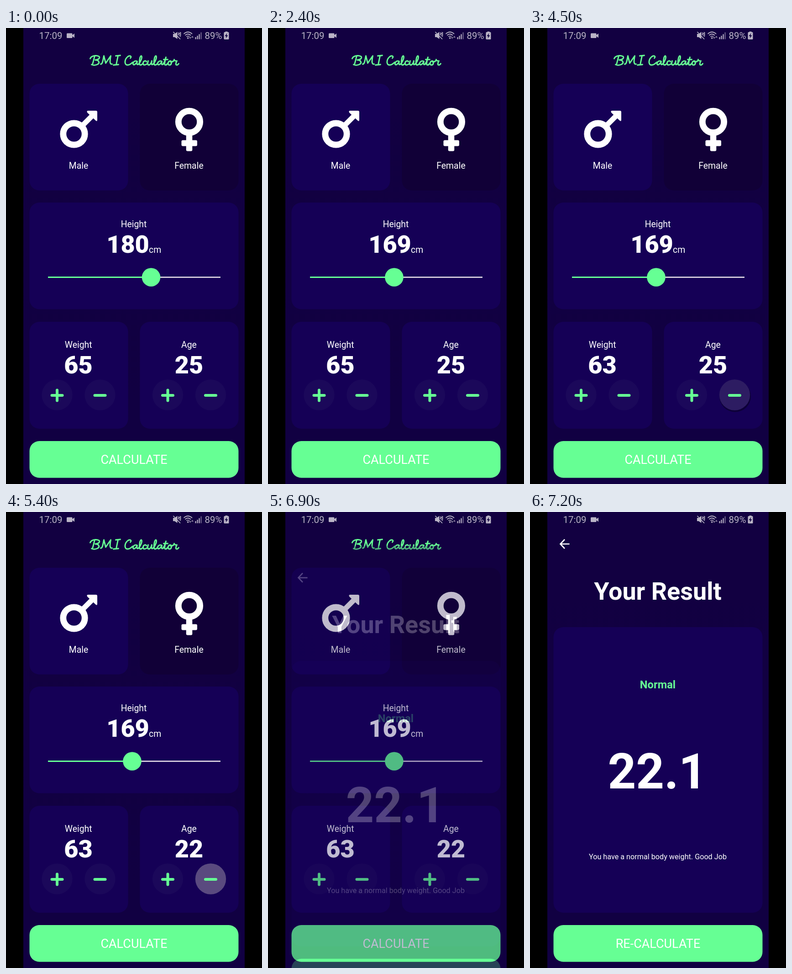
Write an HTML page that moves like this. It is 561x998 px and loops after 8000 ms.

```html
<!DOCTYPE html>
<html lang="en">
<head>
<meta charset="utf-8">
<title>BMI Calculator</title>
<style>
html, body { margin: 0; width: 100%; height: 100%; overflow: hidden; background: #000; }
svg { display: block; width: 100vw; height: 100vh; }
text { font-family: Roboto, sans-serif; font-size: 19.4px; fill: #fff; text-anchor: middle; }
.value { font-size: 53.9px; font-weight: 900; }
.action { font-size: 27px; }
.start { text-anchor: start; }
.green { fill: #66ff94; }
.status text { font-size: 20.5px; fill: #bab4c6; }
</style>
</head>
<body>
<svg id="stage" viewBox="0 0 561 998">
  <defs>
    <clipPath id="screen"><rect x="38" width="485" height="998"/></clipPath>
    <linearGradient id="backdrop" x2="0" y2="1">
      <stop stop-color="#120041"/><stop offset="1" stop-color="#110042"/>
    </linearGradient>
  </defs>
  <rect width="561" height="998"/>
  <g clip-path="url(#screen)">
    <rect x="38" width="485" height="998" fill="url(#backdrop)"/>
    <g id="form">
      <g id="title" role="img" aria-label="BMI Calculator" fill="none" stroke="#66ff94"
         stroke-width="2.9" stroke-linecap="round" stroke-linejoin="round"></g>
      <g id="formCards"></g>
      <g fill="none" stroke="#fff">
        <circle cx="149" cy="232" r="23.7" stroke-width="13.8"/>
        <path d="M168 213 189 192" stroke-width="11.5"/>
        <circle cx="401.5" cy="205.3" r="23.7" stroke-width="13.8"/>
      </g>
      <path fill="#fff" d="M180.5 181H197Q200 181 200 184V200.500Q200 205.500 196.500 202.500L178.500 185.500Q175.500 181 180.500 181Z"/>
      <g fill="#fff">
        <rect x="394.800" y="232" width="13.500" height="37.500" rx="3"/>
        <rect x="384.500" y="245.500" width="34.500" height="13" rx="3"/>
      </g>
      <text x="159" y="308">Male</text>
      <text x="401" y="308">Female</text>
      <text x="280" y="436">Height</text>
      <text id="height" class="value" x="267" y="492"></text>
      <text class="start" x="313" y="491.500">cm</text>
      <path d="M92 545.500H470" stroke="#efe9ee" stroke-width="2.600"/>
      <path id="track" stroke="#66ff94" stroke-width="2.800"/>
      <circle id="halo" cy="545.500" fill="#1b1266"/>
      <circle id="thumb" class="green" cy="545.500" r="20.300"/>
      <text x="158.700" y="700">Weight</text>
      <text id="weight" class="value" x="158.500" y="756"></text>
      <text x="401" y="700">Age</text>
      <text id="age" class="value" x="401" y="756"></text>
      <g id="buttons"></g>
      <text class="action" x="280.500" y="954">CALCULATE</text>
    </g>
    <g id="result">
      <rect x="38" width="485" height="998" fill="url(#backdrop)"/>
      <path d="M86.500 70H67M76 60 66.500 70 76 80" fill="none" stroke="#fff" stroke-width="2.700"/>
      <text x="280" y="191.500" font-weight="700" style="font-size:53.900px">Your Result</text>
      <g id="resultCards"></g>
      <text class="green" x="280" y="386" font-weight="700" style="font-size:23.700px">Normal</text>
      <text x="279" y="605" font-weight="700" style="font-size:107.900px">22.1</text>
      <text x="280" y="760" style="font-size:16.200px">You have a normal body weight. Good Job</text>
      <text class="action" x="280.500" y="954">RE-CALCULATE</text>
    </g>
    <g class="status" fill="#bab4c6">
      <text class="start" x="72.500" y="24">17:09</text>
      <path d="M134.500 11.500H144Q145.500 11.500 145.500 13V15.500L150 12V21.500L145.500 18V20.500Q145.500 22 144 22H134.500Q133 22 133 20.500V13Q133 11.500 134.500 11.500Z"/>
      <path d="M366 13H369.500L375.500 8.500V24L369.500 20H366Z"/>
      <g fill="none" stroke="#bab4c6" stroke-width="1.700">
        <path d="M366.500 8.500 382 24.500M377.500 10l2 2-2 2 2 2M381 9l2 2-2 2 2 2-2 2 2 2"/>
        <path d="M389.500 13Q398.500 4.500 408 13M392.500 16Q398.500 10.500 405 16M395.500 19Q398.500 16.500 402 19"/>
      </g>
      <circle cx="398.700" cy="22" r="1.800"/>
      <path d="M401 20h5l-2.500 4ZM406 21h5l-2.500-4Z" opacity=".7"/>
      <path d="M414.500 20h2.200v4.500h-2.200ZM418.500 17h2.200v7.500h-2.200ZM422.500 13.500h2.200v11h-2.200Z"/>
      <path d="M426.500 9.500h2.200v15h-2.200Z" opacity=".55"/>
      <text class="start" x="435.500" y="24">89%</text>
      <path d="M480.500 9V7.800h5V9H487Q488.500 9 488.500 10.500V23.500Q488.500 25 487 25H479Q477.500 25 477.500 23.500V10.500Q477.500 9 479 9Z"/>
      <path d="M484.500 11 479.500 18H482.500L481.500 23 486.500 16H483.500Z" fill="#120041"/>
    </g>
  </g>
</svg>
<script>
const LOOP = 8000, STEP = 100;
const $ = id => document.getElementById(id);

function add(parent, tag, attrs) {
  const node = document.createElementNS('http://www.w3.org/2000/svg', tag);
  for (const key in attrs) node.setAttribute(key, attrs[key]);
  return parent.appendChild(node);
}

function card(parent, x, y, width, height, fill = '#150056') {
  add(parent, 'rect', { x, y, width, height, rx: 21.5, fill });
}
const GREEN = '#66ff94';
const formCards = $('formCards'), resultCards = $('resultCards');
card(formCards, 51.5, 122, 216, 233.5);
card(formCards, 293.5, 122, 216, 233.5, '#110037');
card(formCards, 51.5, 382, 458, 233.5);
card(formCards, 51.5, 643, 216, 234);
card(formCards, 293.5, 643, 216, 234);
card(formCards, 51.5, 904, 458, 80.5, GREEN);
card(resultCards, 51.5, 252, 458, 625);
card(resultCards, 51.5, 904, 458, 80.5, GREEN);

// Script lettering: each glyph is a pen stroke relative to its baseline.
const glyphs = {
  B: 'M1-14C3-20 13-22 20-19C24-16 19-11 12-11C21-11 23-4 16-1C11 1 6 0 4-1M11-20 6-1',
  M: 'M0-2C4-1 5-11 7-20L11-4 22-20C21-13 18-1 25-2',
  I: 'M5-20 15-21M10-20 6-1M0 0 11-1',
  C: 'M13-15C17-19 12-22 7-18C0-12-1 0 7 0C12 0 15-3 18-6',
  a: 'M10-8C4-11 0-5 1-2C3 2 8-3 10-8C9-3 9 1 13-2',
  l: 'M0-2C5-7 9-18 6-20C2-19 0 0 4 0Q7 0 9-3',
  c: 'M8-7C8-11 1-9 1-4C1 2 7 0 10-3',
  u: 'M2-9C0-2 1 0 4 0C7-1 9-5 10-9C9-2 9 1 13-2',
  t: 'M0-2C3-7 5-12 6-17C3-6 2 0 5 0Q8 0 9-3M1-12H10',
  o: 'M6-9C0-8 0 0 4 0C9 0 10-8 6-9C6-6 9-6 12-8',
  r: 'M0-8Q3-9 3-12C4-8 7-9 9-9C6-4 6 0 9 0Q11 0 13-3'
};
const advance = { B: 24, M: 28, I: 24, C: 18, a: 13, l: 9, c: 10, u: 13, t: 9.5, o: 11.5, r: 12 };
let pen = 183.5;
for (const letter of 'BMICalculator') {
  add($('title'), 'path', { d: glyphs[letter], transform: `translate(${pen} 81)` });
  pen += advance[letter];
}

function roundButton(x, plus) {
  const shadow = add($('buttons'), 'circle', { cx: x + 1, cy: 806, r: 34.5, fill: '#0d0038' });
  const face = add($('buttons'), 'circle', { cx: x, cy: 803, r: 33.7 });
  add($('buttons'), 'path', {
    d: `M${x - 11.5} 804h23` + (plus ? `M${x} 792.5v23` : ''),
    stroke: GREEN, 'stroke-width': 6, 'stroke-linecap': 'round'
  });
  return press => {
    face.setAttribute('fill', ['#1b085a', '#2d1c62', '#5a4a7f', '#3b2a6c'][press]);
    shadow.setAttribute('opacity', press === 1 ? 1 : 0);
  };
}
const weightPlus = roundButton(112, true), weightMinus = roundButton(206, false);
const agePlus = roundButton(354.5, true), ageMinus = roundButton(448.5, false);
weightPlus(0);
agePlus(0);

// Taps as [finger down, finger up].
const weightTaps = [[3000, 3200], [3400, 3500]];
const ageTaps = [[4400, 4600], [4800, 4900], [5300, 5400]];
const tapCount = (taps, t) => taps.filter(tap => t >= tap[1]).length;
function pressState(taps, t) {
  const tap = taps.find(([down, up]) => t >= down && t < up + 200);
  if (!tap) return 0;
  return t < tap[1] ? 1 : t < tap[1] + 100 ? 2 : 3;
}

const clamp = v => Math.min(1, Math.max(0, v));

function bezier(x1, y1, x2, y2) {
  const at = (a, b, s) => 3 * a * s * (1 - s) ** 2 + 3 * b * s * s * (1 - s) + s ** 3;
  return x => {
    let low = 0, high = 1;
    for (let i = 0; i < 24; i++) {
      const mid = (low + high) / 2;
      if (at(x1, x2, mid) < x) low = mid; else high = mid;
    }
    return at(y1, y2, low);
  };
}
const slideEase = bezier(0.4, 0, 0.2, 1), fadeEase = bezier(0.42, 0, 1, 1);

function render(t) {
  const height = Math.round(180 - 11.2 * clamp((t - 1000) / 800));
  const x = 91.5 + 3.775 * (height - 120);
  const haloSize = Math.min(clamp((t - 950) / 150), clamp((2100 - t) / 300));
  $('height').textContent = height;
  $('track').setAttribute('d', `M92 545.5H${x}`);
  $('thumb').setAttribute('cx', x);
  $('halo').setAttribute('cx', x);
  $('halo').setAttribute('r', 40.5 * haloSize);

  $('weight').textContent = 65 - tapCount(weightTaps, t);
  $('age').textContent = 25 - tapCount(ageTaps, t);
  weightMinus(pressState(weightTaps, t));
  ageMinus(pressState(ageTaps, t));

  const p = clamp((t - 6765) / 300);
  const shift = p < 1 ? 249.5 * (1 - slideEase(p)) : 0;
  $('result').setAttribute('transform', `translate(0 ${shift})`);
  $('result').setAttribute('opacity', p < 1 ? fadeEase(p) : 1);
  $('result').setAttribute('visibility', p > 0 ? 'visible' : 'hidden');
}

const begin = performance.now();
function tick() {
  const t = (performance.now() - begin) % LOOP;
  render(Math.floor(t / STEP) * STEP);
  requestAnimationFrame(tick);
}
tick();
</script>
</body>
</html>
```
